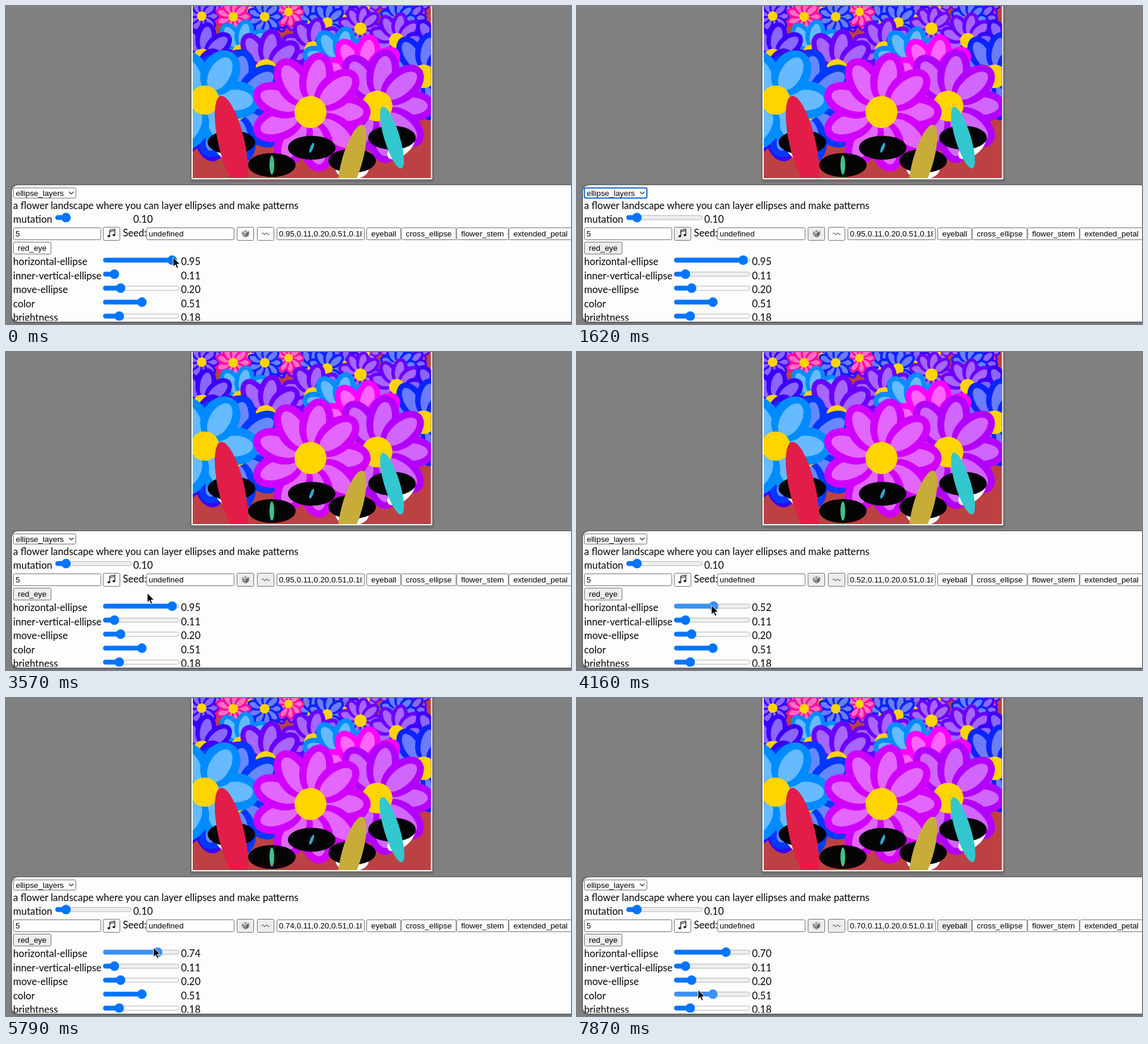
Recreate the animation shown at these times as an HTML page. Size 950 by 534 pixels, loop 8000 ms.

```html
<!DOCTYPE html>
<html lang="en">
<head>
<meta charset="utf-8">
<title>Ellipse layers</title>
<style>
  html, body { margin: 0; width: 100%; height: 100%; overflow: hidden; background: #808080; }
  #stage { display: block; width: 950px; height: 534px; }
  .label { font: 16.6px Lato, "Open Sans", sans-serif; fill: #050505; }
  .field { font: 13.33px "Liberation Sans", Arial, sans-serif; fill: #000; }
  .box { fill: #fff; stroke: #707070; }
  .hot { fill: #ededed; }
  .focus { stroke: #0b62d6; stroke-width: 2; }
</style>
</head>
<body>
<svg id="stage" viewBox="0 0 950 534">
  <defs>
    <clipPath id="art"><path d="M314 0H714.500V289H314Z"/></clipPath>
    <clipPath id="view"><path d="M10 301H950V528.500H10Z"/></clipPath>
  </defs>
  <path fill="#808080" d="M0 0H950V534H0Z"/>
  <rect x="309.500" y="-10" width="410.500" height="306" rx="5" fill="#6f6f6f"/>
  <path fill="#fff" d="M312 0H716.500V291H312Z"/>
  <g clip-path="url(#art)">
    <path fill="#bc4143" d="M314 0H715V289H314Z"/>
    <g id="flowers"></g>
    <g fill="#fff">
      <ellipse cx="373" cy="246" rx="24" ry="13" transform="rotate(35 373 246)"/>
      <ellipse cx="664" cy="238" rx="27" ry="13" transform="rotate(-37 664 238)"/>
      <ellipse cx="582" cy="273" rx="28" ry="18"/>
    </g>
    <g id="eyes"></g>
  </g>

  <rect x="8" y="299.500" width="960" height="233.500" rx="11" fill="#686868"/>
  <rect x="10" y="301" width="960" height="229" rx="10" fill="#fdfdfd"/>

  <rect id="select" x="12.500" y="305.500" width="105" height="17" rx="2" class="box"/>
  <text class="field" x="16.500" y="318.500">ellipse_layers</text>
  <path d="M106 312l3.700 3.700 3.700-3.700" fill="none" stroke="#222" stroke-width="1.200"/>
  <text class="label" x="12" y="340.500">a flower landscape where you can layer ellipses and make patterns</text>

  <g id="boxes"></g>
  <text class="field" x="16" y="386.500">5</text>
  <text class="label" x="196.500" y="386.800">Seed:</text>
  <text class="field" x="240" y="386.500">undefined</text>
  <svg x="458" y="373" width="140.500" height="18"><text id="genes" class="field" x="1" y="13.500"></text></svg>

  <g stroke="#111" stroke-width="1.200" fill="#111">
    <path fill="none" d="M174.500 386V376.500L183 374.500V384M174.500 379L183 377"/>
    <ellipse cx="172.900" cy="386.600" rx="1.700" ry="1.200"/>
    <ellipse cx="181.400" cy="384.800" rx="1.700" ry="1.200"/>
    <path fill="none" stroke-width="1" d="M430 382.500q1.700-3 3.300 0t3.300 0 3.300 0 3.300 0"/>
  </g>
  <path fill="#cfcfcf" d="M396 378.500L403 375.500 409 378 402.500 381.500Z"/>
  <path fill="#a9a9a9" d="M396 378.500L402.500 381.500V389L397 385.500Z"/>
  <path fill="#777" d="M409 378L402.500 381.500V389L408.500 385Z"/>
  <path stroke="#333" stroke-width="1.800" stroke-linecap="round" d="M402.500 378.400h0M398.500 382h0M400.700 385.500h0M406 382h0M405 386h0"/>

  <g id="rows" clip-path="url(#view)"></g>
  <path id="cursor" d="M0 0V16L3.700 12.500 6.200 18.300 8.800 17.200 6.300 11.600H11.400Z" fill="#000" stroke="#fff"/>
</svg>
<script>
const NS = 'http://www.w3.org/2000/svg';
const $ = id => document.getElementById(id);

function add(parent, tag, attrs, text) {
  const el = document.createElementNS(NS, tag);
  for (const k in attrs) el.setAttribute(k, attrs[k]);
  if (text) el.textContent = text;
  return parent.appendChild(el);
}

// Nearer flowers stand lower and grow with y. Each petal overlaps the one before it.
function flower(x, y, color, count = 9) {
  const size = 3.75 * (6 + y * .118);
  const g = add($('flowers'), 'g', { transform: `translate(${x} ${y}) scale(${size})` });
  const wide = .16 + 1.1 / count;
  for (let i = 0; i < count; i++) {
    const transform = `rotate(${i * 360 / count})`;
    add(g, 'ellipse', { cx: .57, rx: .43, ry: wide, fill: color, transform });
    add(g, 'ellipse', { cx: .55, rx: .33, ry: wide * .55, fill: '#fff', 'fill-opacity': .4, transform });
  }
  add(g, 'circle', { r: .266, fill: '#ffd400' });
}

let seed = 7;
const random = () => (seed = seed * 16807 % 2147483647) / 2147483647;

const pink = '#ff0a9e', violet = '#6a00ff', indigo = '#3a00ff', blue = '#0a24ff',
      azure = '#008cff', magenta = '#ff00ff', purple = '#b200ff', orchid = '#d000ff';
const hues = [pink, violet, indigo, blue, violet];

for (let i = 0; i < 36; i++)
  flower(314 + 400 * random(), -28 + i * 1.5, hues[Math.floor(random() * hues.length)]);

[
  [411, 8, violet], [475, 10, pink], [329, 17, indigo], [435, 18, blue], [382, 18, pink],
  [540, 28, blue], [596, 38, violet], [657, 58, violet], [722, 70, indigo], [516, 74, violet],
  [395, 80, azure], [330, 88, indigo], [562, 100, azure], [437, 108, violet], [702, 118, blue],
  [600, 124, magenta], [334, 166, indigo], [383, 168, '#0038ff'], [334, 158, azure, 6],
  [624, 168, purple], [512, 178, orchid]
].forEach(spec => flower(...spec));

function eye(x, y, rx, ry, tilt, fill) {
  add($('eyes'), 'ellipse', { cx: x, cy: y, rx: 40, ry: 20, fill: '#040404' });
  return add($('eyes'), 'ellipse', { rx, ry, fill, transform: `translate(${x} ${y}) rotate(${tilt})` });
}
eye(379, 229, 22, 80, -13, '#e21d48');
eye(447, 267, 4, 16, 0, '#3fc18b');
eye(514, 238, 2.6, 9, 22, '#2fabd3');
eye(582, 260, 17, 63, 16, '#c7ac3a');
const pupil = eye(649, 221, 13, 54, -17, '#33c7d0');

const box = (x, y, width, height) =>
  add($('boxes'), 'rect', { x: x + .5, y: y + .5, width, height, rx: 2, class: 'box' });

[12, 236, 455].forEach(x => box(x, 372, 147, 20));
const [music, dice, wave] = [163, 388, 422].map(x => box(x, 371, 28, 22));

// Captioned buttons flow to the right, as wide as their text
function buttons(x, y, captions) {
  return captions.map(caption => {
    const el = box(x, y, 0, 20);
    const text = add($('boxes'), 'text', { x: x + 8, y: y + 14.7, class: 'field' }, caption);
    const width = text.getComputedTextLength() + 15;
    el.setAttribute('width', width);
    x += width + 1;
    return el;
  });
}
const [eyeball] = buttons(606, 372, ['eyeball', 'cross_ellipse', 'flower_stem', 'extended_petal']);
const [redEye] = buttons(12, 396, ['red_eye']);

const accent = '#0075ff', hover = '#3b91f7';

function slider(name, x, y, value, bare) {
  add($('rows'), 'text', { x: 12, y, class: 'label' }, name);
  const number = add($('rows'), 'text', { x: x + 131, y, class: 'label' });
  const g = add($('rows'), 'g', { transform: `translate(${x} ${y - 8.2})` });
  const track = add(g, 'rect', { x: .5, y: -3.5, width: 127, height: 7, rx: 3.5 });
  const bar = add(g, 'rect', { y: -4, height: 8, rx: 4 });
  const thumb = add(g, 'circle', { r: 8 });
  return {
    value,
    draw(full, color = accent) {
      const at = 6.3 + this.value * 115.5;
      number.textContent = this.value.toFixed(2);
      track.setAttribute('fill', full ? '#efefef' : '#fdfdfd');
      track.setAttribute('stroke', full || !bare ? '#b4b4b4' : 'none');
      bar.setAttribute('width', at);
      thumb.setAttribute('cx', at);
      g.setAttribute('fill', color);
    }
  };
}

const mutation = slider('mutation', 83, 363.5, .1, true);
const row = (i, name, value, bare) => slider(name, 163.3, 435 + i * 23.5, value, bare);
const horizontal = row(0, 'horizontal-ellipse', .95, true);
const inner = row(1, 'inner-vertical-ellipse', .11, true);
const move = row(2, 'move-ellipse', .2);
const color = row(3, 'color', .51, true);
const bright = row(4, 'brightness', .18);
const genes = [horizontal, inner, move, color, bright];

// Keys: beat, pointer x, y, slider value
const BEAT = 148.5;
const keys = [
  [0, 281, 422, .95], [2, 281, 422, .95], [4, 52, 405, .95], [5, 117, 421, .95], [9, 290, 431, .95],
  [21, 177, 376, .95], [26, 278, 424, .95], [28, 226, 425, .52], [34, 256, 420, .79],
  [39, 248, 419, .74], [41, 243, 419, .7], [46, 173, 464, .7], [50, 190, 490, .7], [54, 208, 490, .7]
];

function pose(beat) {
  const i = keys.findIndex(key => key[0] > beat);
  const a = keys[i - 1], b = keys[i];
  const k = (beat - a[0]) / (b[0] - a[0]);
  return a.map((from, j) => from + (b[j] - from) * k).slice(1);
}

function draw(t) {
  const beat = Math.floor((t + 15) / BEAT);
  const during = (from, to = Infinity) => beat >= from && beat < to;
  const [x, y, value] = pose(beat);

  $('cursor').setAttribute('transform', `translate(${x} ${y})`);
  $('cursor').setAttribute('visibility', during(9, 21) ? 'hidden' : 'visible');
  $('select').classList.toggle('focus', during(4, 19));

  const heat = (el, on) => el.classList.toggle('hot', on);
  heat(music, during(3, 22));
  heat(dice, during(3));
  heat(wave, during(21));
  heat(redEye, during(4));
  heat(eyeball, during(47));

  horizontal.value = value;
  mutation.draw(during(3));
  horizontal.draw(during(2), during(27, 42) ? hover : accent);
  inner.draw(during(10));
  move.draw(during(47));
  color.draw(during(48), during(49) ? hover : accent);
  bright.draw(false);

  $('genes').textContent = genes.map(gene => gene.value.toFixed(2)).join(',');
  pupil.setAttribute('ry', during(35) ? 57 : 54);
}

const start = performance.now();
function tick() {
  draw((performance.now() - start) % 8000);
  requestAnimationFrame(tick);
}
tick();
</script>
</body>
</html>
```
